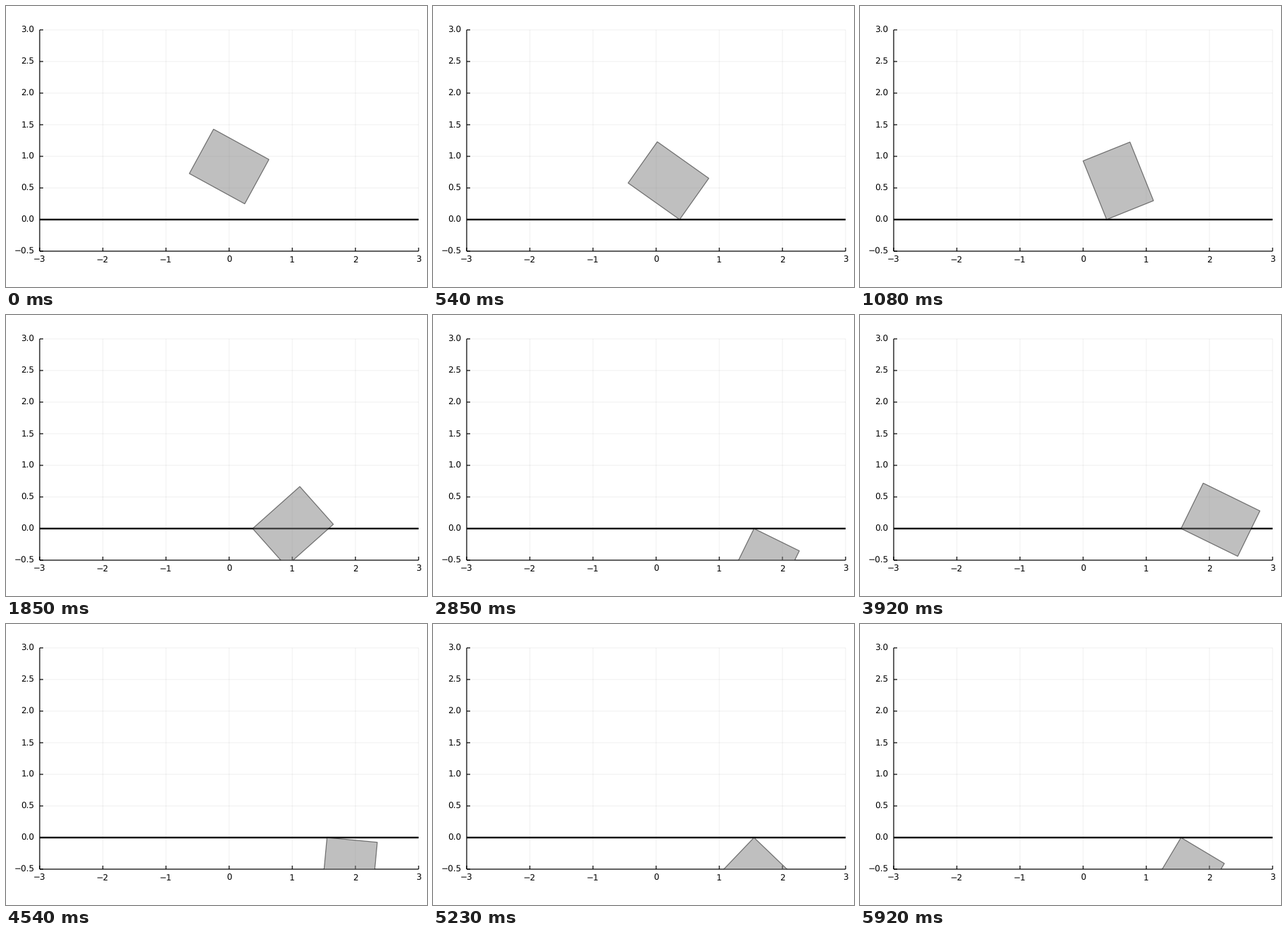
Animation of 600x400 px, one loop 5990 ms. Source, as a matplotlib script:

```python
import numpy as np
import matplotlib.pyplot as plt
from matplotlib.animation import FuncAnimation
from matplotlib.patches import Polygon, Rectangle

plt.rcParams["font.family"] = "DejaVu Sans"
plt.rcParams["text.hinting"] = "none"

W, H = 600, 400
LEFT, RIGHT, TOP, BOTTOM = 48, 588, 34, 349
SCALE, X0, Y0 = 90, 318, 304
LOOP_MS = 5990
PX = 72 / 100
STROKE = 1.2

# Box of 0.8 by 1.0; the pivots are the two corners that touch the floor
CORNERS = np.array([(-.4, -.5), (.4, -.5), (.4, .5), (-.4, .5)])
FIRST, SECOND = CORNERS[0], CORNERS[3]
GRAVITY = 9.81
RADIUS = np.hypot(.4, .5)
INERTIA = (1 + .64) / 12 + RADIUS ** 2
REST = np.degrees(np.arctan2(.4, .5))

# Contact times; each state is stored before and after the contact
LAND, TIP, FLAT, RELEASE, CATCH, STICK, RISE, SETTLE = (
    .219, .697, .747, .8955, .994, 1.042, 1.2035, 2.305)
BRAKE = 2.15
contacts = np.repeat([LAND, TIP, FLAT, RELEASE, CATCH, STICK, RISE, SETTLE],
                     [2, 2, 2, 2, 2, 4, 2, 4])
times = np.sort(np.concatenate([np.arange(58) * .05, contacts]))


def rotation(deg):
    c, s = np.cos(np.radians(deg)), np.sin(np.radians(deg))
    return np.array([(c, -s), (s, c)])


def centre_on(pivot, corner, deg):
    return np.array(pivot) - rotation(deg) @ corner


def swing(start, end, deg, speed, corner, step=.0005):
    """Angle over time of the box turning freely about a fixed corner."""
    lean = np.arctan2(-corner[1], -corner[0])
    ts = np.arange(start, end + step, step)
    angle, rate = np.radians(deg), np.radians(speed)
    angles = []
    for _ in ts:
        angles.append(angle)
        rate -= GRAVITY * RADIUS / INERTIA * np.cos(angle + lean) * step
        angle += rate * step
    angles = np.degrees(angles)
    return lambda t: np.interp(t, ts, angles)


PIVOT_1, PIVOT_2 = (.372, 0), (1.55, 0)
tilt = swing(LAND, TIP, 58, -110, FIRST)
topple = swing(TIP, RELEASE, 10.4, -250, FIRST)
lift = swing(STICK, RISE, -67.2, 371, SECOND)
pendulum = swing(RISE, BRAKE, -6.36, 287, SECOND)


def hanging(t):
    if t < RISE:
        return lift(t)
    if t <= BRAKE:
        return pendulum(t)
    if t <= SETTLE:
        d = t - BRAKE
        return pendulum(BRAKE) - 285 * d + 560 * d * d
    return -REST - 11.8 * np.cos(7.6 * (t - 2.548))


def pose(t):
    """Centre and angle of the box at time t."""
    if t < LAND:
        p = t / LAND
        return np.array([.16 * p, .839 - .235 * p * p]), 61.35 - 3.35 * p
    if t <= RELEASE:
        deg = tilt(t) if t < TIP else topple(t)
        return centre_on(PIVOT_1, FIRST, deg), deg
    if t < CATCH:
        p = (t - RELEASE) / (CATCH - RELEASE)
        begin = topple(RELEASE)
        a = centre_on(PIVOT_1, FIRST, begin)
        b = centre_on((1.505, 0), SECOND, -73.5)
        return a + (b - a) * p, begin + (-73.5 - begin) * p
    if t < STICK:
        p = (t - CATCH) / (STICK - CATCH)
        deg = -73.5 + 6.3 * p
        return centre_on((1.505 + .045 * p, 0), SECOND, deg), deg
    deg = hanging(t)
    return centre_on(PIVOT_2, SECOND, deg), deg


def outline(t):
    centre, deg = pose(t)
    pts = centre + CORNERS @ rotation(deg).T
    return np.column_stack([X0 + SCALE * pts[:, 0], Y0 - SCALE * pts[:, 1]])


fig = plt.figure(figsize=(W / 100, H / 100), dpi=100, facecolor="white")
ax = fig.add_axes([0, 0, 1, 1])
ax.set_xlim(0, W)
ax.set_ylim(H, 0)
ax.axis("off")


def line(xs, ys, width=STROKE, **style):
    ax.plot(xs, ys, color="black", lw=width * PX, snap=False,
            solid_capstyle="butt", **style)


def grid_line(xs, ys):
    line(xs, ys, width=STROKE / 2, alpha=.1, zorder=1)


def label(x, y, text, align):
    ax.text(x, y, text.replace("-", "\u2212"), fontsize=12 * PX, ha=align,
            va="baseline", color="black", zorder=3)


for v in range(-3, 4):
    x = X0 + SCALE * v
    grid_line([x, x], [TOP, BOTTOM])
    line([x, x], [BOTTOM - 5, BOTTOM], zorder=2)
    label(x, 365, str(v), "center")

for v in np.arange(-.5, 3.1, .5):
    y = Y0 - SCALE * v
    grid_line([LEFT, RIGHT], [y, y])
    line([LEFT, LEFT + 5], [y, y], zorder=2)
    label(40.6, y + 4.3, f"{v:.1f}", "right")

line([LEFT, LEFT], [TOP, BOTTOM], zorder=2)
line([LEFT, RIGHT], [BOTTOM, BOTTOM], zorder=2)
line([LEFT, RIGHT], [Y0, Y0], width=2 * STROKE, zorder=3)

box = Polygon(outline(0), closed=True, facecolor=(.5, .5, .5, .5),
              edgecolor=(0, 0, 0, .5), lw=STROKE * PX, zorder=4)
ax.add_patch(box)
box.set_clip_path(Rectangle((LEFT, TOP), RIGHT - LEFT, BOTTOM - TOP,
                            transform=ax.transData))


def update(i):
    box.set_xy(outline(times[i]))
    return (box,)


anim = FuncAnimation(fig, update, frames=len(times),
                     interval=LOOP_MS / len(times), repeat=True,
                     repeat_delay=0, blit=False)
plt.show()
```
